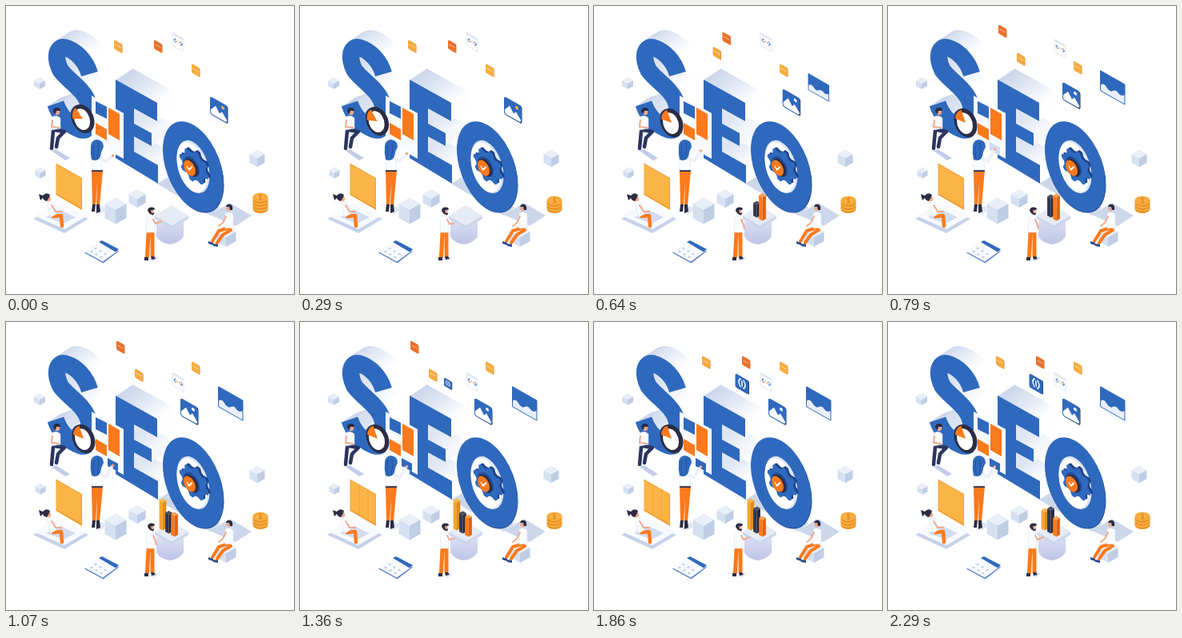
Recreate the animation shown at these times as an HTML page. Size 360 by 360 pixels, loop 2.43 s.

```html
<!DOCTYPE html>
<html lang="en">
<head>
<meta charset="utf-8">
<title>SEO isometric scene</title>
<style>
  html, body { margin: 0; width: 100%; height: 100%; overflow: hidden; background: #fff; }
  svg { display: block; width: 100vw; height: 100vh; }
  .b { fill: #2f69bd } .o { fill: #fb7a1c } .y { fill: #fbb447 } .d { fill: #2b2d45 }
  .w { fill: #fff } .s { fill: #f2a98b } .l { fill: #cdd7ec } .p { fill: #f8fafe }
  .shirt { fill: #fbfcff; stroke: #d5dcec; stroke-width: .5 }
  .line { fill: none; stroke-linecap: round; stroke-linejoin: round }
</style>
</head>
<body>
<svg viewBox="0 0 360 360">
  <defs>
    <linearGradient id="side"><stop stop-color="#cbd6eb"/><stop offset=".55" stop-color="#e4eaf6"/><stop offset="1" stop-color="#fff"/></linearGradient>
    <linearGradient id="base" x2="0" y2="1"><stop stop-color="#dcdff2"/><stop offset="1" stop-color="#bec4e8"/></linearGradient>
    <path id="S" fill="none" stroke-width="21.5" d="M104.500 85C100 69 88 56 74 52C62 50 61 66 68 80C76 92 98 104 103 122C108 146 104 159 92 154C77 148 67 137 62 122"/>
    <path id="E" d="M137 92L189 121V144L160 128V147L182 159V175L160 163V182L190 199V222L137 190Z"/>
  </defs>

  <!-- ground shadows -->
  <path class="l" d="M189 222L202 214L268 252L255 262ZM255 261L280 246L307 262L287 275Z"/>
  <g id="letters"></g>

  <!-- letter O with gear -->
  <g transform="matrix(1 .57 0 1 234 201)">
    <ellipse cx=".5" cy=".5" rx="38" ry="52.5" fill="#1e438c"/>
    <ellipse class="b" rx="38" ry="52.5"/>
    <ellipse rx="20.5" ry="31" fill="#dbe4f3"/>
    <ellipse class="w" cx="-1.5" cy="1.5" rx="19" ry="29.5"/>
    <path id="gearSide" fill="#1e438c" transform="translate(3.5 -4)"/>
    <path id="gear" class="b" transform="translate(1 -1)"/>
    <ellipse cx="-2" cy="1" rx="10" ry="11.5" fill="#24498f"/>
    <ellipse class="d" cx="-2.500" cy="2.500" rx="8.500" ry="10"/>
    <ellipse class="o" cx="-4.500" cy="4" rx="7.500" ry="9"/>
    <path class="line" stroke="#fff" stroke-width="1.500" d="M-7.500 4L-5.500 7L-1.500 1"/>
  </g>

  <g id="cubes"></g>

  <!-- page panel -->
  <path class="p" d="M107 112L147 134V191L107 169Z"/>
  <path class="b" d="M112 119L126 126V141L112 134Z"/>
  <path class="o" d="M128 127L142 135V168L128 160ZM112 146L126 154V168L112 160Z"/>
  <path class="b" id="block" d="M127 170L140 177V187L127 180Z"/>

  <!-- ring chart -->
  <g id="ring">
    <ellipse class="b" cx="-2" cy="1" rx="14" ry="17"/>
    <ellipse class="d" rx="14.500" ry="17.500"/>
    <ellipse class="w" cx="-1" cy="1" rx="10" ry="13"/>
    <path class="o" id="wedge"/>
  </g>

  <!-- seated reader -->
  <path d="M57 181L62 179L80 190L74 193Z" fill="#c3cbea"/>
  <path class="b" d="M62 150L82 146L85 152L70 159L62 157Z"/>
  <path class="line" stroke="#2c3560" stroke-width="4.500" d="M61 155L73 157L65 165L63 176M59 156L57 178"/>
  <path class="shirt" d="M57 139Q63 135 68 140L68 153L57 155Z"/>
  <path class="line" stroke="#f2a98b" stroke-width="2" d="M58 143L57 151L66 152"/>
  <ellipse class="s" cx="64" cy="132.500" rx="3.200" ry="3.800"/>
  <path class="d" d="M59 132Q59 127 64 127Q68 127 68 131L63 131L62 135Z"/>

  <!-- standing woman -->
  <path d="M112 256L120 250L126 254L117 261Z" fill="#e2e8f4"/>
  <path class="o" d="M107 206H121L117 249H113L114 220L112 249H108Z"/>
  <path class="d" d="M107 205H121V207H107ZM108 248H112L111 257H107ZM113 248H117L118 257L113 259Z"/>
  <path class="shirt" d="M107 186L119 184L121 205L107 205Z"/>
  <path class="line" id="sleeve" stroke="#eef1f9" stroke-width="4"/>
  <circle class="s" id="hand" r="1.800"/>
  <path class="b" d="M106 175Q107 167 114 167Q122 168 122 176Q119 181 118 188Q115 195 107 192Q105 184 106 175Z"/>
  <path class="line" stroke="#1f4b97" stroke-width=".8" d="M110 173Q108 183 110 191M115 171Q117 180 114 191"/>

  <!-- laptop and its user -->
  <path d="M34 266L66 250L103 266L73 284Z" fill="#c6d1ea"/>
  <path class="p" d="M35 262L66 246L102 262L73 279Z"/>
  <path d="M50 264L68 255L87 264L72 272Z" fill="#d3dcef"/>
  <path d="M62.500 196.500L95 215V255L62.500 236Z" fill="#f49d33"/>
  <path class="y" d="M63 198L94 215.500V252L63 234.500Z"/>
  <path class="line" id="columns" stroke="#ef9a2a" stroke-width=".8" d="M74 204V241M85 210V247"/>
  <path class="line" stroke="#fb7a1c" stroke-width="4.500" d="M59 263L69 262L70 275"/>
  <path class="shirt" d="M51 246L59 245L63 260L56 264Z"/>
  <path class="line" stroke="#f2a98b" stroke-width="2" d="M57 249L62 257L69 257"/>
  <circle class="s" cx="53" cy="241" r="3.200"/>
  <path class="d" d="M41 235L46 237Q50 232 55 236L54 239L51 244Q47 243 46 240L43 243Z"/>

  <!-- calendar -->
  <path d="M98 308.500L118 294L141 306.500L121.500 321.500Z" fill="#5f87ca"/>
  <path class="p" d="M98 307L118 293L141 305L121 319.500Z"/>
  <path class="b" d="M116 295L120 293L141 304L137 307.500Z"/>
  <g id="days" fill="#c4d0ea"></g>

  <!-- table, bars and presenter -->
  <path d="M188 268L207 277L222 268V288Q217 296 205 298Q192 296 188 288Z" fill="url(#base)"/>
  <path class="l" d="M186 262L207 274L228 262V266L207 279L186 266Z"/>
  <path d="M186 262L207 249L228 262L207 274Z" fill="#e6ebf6"/>
  <g id="bars"></g>
  <path d="M179 317L186 312L191 315L184 320Z" fill="#e4e9f5"/>
  <path class="line" stroke="#fb7a1c" stroke-width="5" d="M178 284L176.500 313M183 284L183 312"/>
  <path class="d" d="M173 314H178V318H173ZM181 313H185L187 316L182 317Z"/>
  <path class="shirt" d="M176 264Q180 260 185 263L186 283L175 283Z"/>
  <path class="line" id="arm" stroke="#f2a98b" stroke-width="2"/>
  <circle class="s" cx="181.500" cy="257" r="3.200"/>
  <path class="d" d="M177 256Q177 251.500 182 251.500Q186 251.500 186 254.500L181 255.500L182 259L185.500 258.500L184 261.500L180 260Z"/>

  <!-- seated man -->
  <path class="line" stroke="#fb7a1c" stroke-width="4" d="M279 277L266 281L258 294M281 280L271 286L264 296"/>
  <path d="M253 294L259 296V299L253 297ZM259 297L265 298V301L259 300Z" fill="#2c4a8c"/>
  <path class="shirt" d="M274 259Q279 256 284 260L284 277L274 278Z"/>
  <path class="line" stroke="#f2a98b" stroke-width="1.800" d="M275 263L271 271L266 275"/>
  <circle class="s" cx="278.500" cy="253" r="3.200"/>
  <path class="d" d="M275 251Q276 246.500 281 248Q284 250 283 255L280 255L279 251Z"/>

  <g id="coins"></g>

  <!-- floating cards -->
  <g id="wave"><rect class="b" x="-16" y="-13" width="31.500" height="26" rx="1"/>
    <path d="M-15 5Q-12 1-9 3Q-4 9 0 4Q4 0 7 3Q10 6 14.500 1V12H-15Z" fill="#e9effa"/></g>
  <g id="photo"><rect class="d" x="-10.500" y="-11" width="22" height="22" rx="2.500"/><rect class="b" x="-11" y="-11" width="22" height="22" rx="2.500"/>
    <path class="w" d="M-10 5L-4-3L1 4L4 0L10 7V8.500L8.500 10H-8.500L-10 8.500Z"/><circle id="sun" cx="5" cy="-5.500" r="2"/></g>
  <g id="code"><rect x="-7" y="-8" width="14" height="16" rx="1.500" fill="#fdfdff" stroke="#d9e1ef" stroke-width=".7"/>
    <path d="M-6.500-7.500H6.500V-5.500H-6.500Z" fill="#dbe4f1"/>
    <path class="line" stroke="#5f87ca" stroke-width="1.200" d="M-3-2L-5 0L-3 2M3.500-2L5.500 0L3.500 2"/>
    <path class="line" stroke="#fb7a1c" stroke-width="1.300" d="M-1.500 0H-1M1.500 0H2"/></g>
  <g id="info"><rect class="d" x="-8" y="-8" width="17" height="17" rx="2"/><rect class="b" x="-8.500" y="-8" width="17" height="17" rx="2"/>
    <path class="line" stroke="#fff" stroke-width="1.500" d="M-2-5Q-6 0-2 5M2-5Q6 0 2 5M0-3V3"/></g>
  <g id="tagA"></g><g id="tagB"></g><g id="tagC"></g>
</svg>
<script>
const $ = id => document.getElementById(id);
const set = (id, attrs) => { for (const k in attrs) $(id).setAttribute(k, attrs[k]); };

// Letters: light copies pushed back, then the blue face
function extrude(id, dx, dy, paint) {
  let out = '';
  for (let i = 20; i >= 0; i--) {
    const fill = i ? 'url(#side)' : '#2f69bd';
    out += `<use href="#${id}" ${paint}="${fill}" transform="translate(${dx * i / 20} ${-dy * i / 20})"/>`;
  }
  return out;
}
$('letters').innerHTML = extrude('S', 17, 11, 'stroke') + extrude('E', 21, 14, 'fill');

const box = (x, y, w, h, top, left, right) => {
  const r = w / 2, q = w * .28;
  return `<path fill="${left}" d="M${x - r} ${y}l${r} ${q}v${h}l${-r} ${-q}z"/>` +
    `<path fill="${right}" d="M${x + r} ${y}l${-r} ${q}v${h}l${r} ${-q}z"/>` +
    `<path fill="${top}" d="M${x - r} ${y}l${r} ${-q}l${r} ${q}l${-r} ${q}z"/>`;
};
$('cubes').innerHTML = [[42, 93, 14, 7], [43, 205, 13, 7], [137, 247, 27, 18], [164, 235, 21, 11],
  [314, 185, 19, 11], [275, 282, 25, 12]]
  .map(c => box(...c, '#e8eff8', '#d5e0f0', '#bfcde5')).join('');

let gear = 'M';
for (let i = 0; i < 32; i++) {
  const a = (i + .5) * Math.PI / 16, r = i % 4 < 2 ? 18.5 : 15;
  gear += `${(r * Math.cos(a)).toFixed(1)} ${(r * 1.08 * Math.sin(a)).toFixed(1)} `;
}
set('gear', { d: gear + 'Z' });
set('gearSide', { d: gear + 'Z' });

let days = '';
for (let i = 0; i < 6; i++) {
  const u = i % 3, v = i / 3 | 0;
  days += `<ellipse cx="${112 + u * 6 - v * 5}" cy="${303 + u * 3.5 + v * 4}" rx="1.700" ry="1.300"/>`;
}
$('days').innerHTML = days;

const tag = color => `<rect x="-4.500" y="-5" width="10" height="11" rx="1.500" fill="#d07a34"/>
  <rect x="-5" y="-5" width="10" height="11" rx="1.500" fill="${color}"/>
  <path class="line" stroke="#fff" stroke-opacity=".6" d="M-3 0H-1M0 0H1M2 0H3"/>`;
$('tagA').innerHTML = tag('#ea702a');
$('tagB').innerHTML = tag('#f7a93e');
$('tagC').innerHTML = tag('#f9ae3c');

// Eased value at t from pairs: time, value, time, value ...
function at(t, ...k) {
  if (t <= k[0]) return k[1];
  for (let i = 2; i < k.length; i += 2) if (t <= k[i]) {
    const u = (t - k[i - 2]) / (k[i] - k[i - 2]);
    return k[i - 1] + (k[i + 1] - k[i - 1]) * u * u * (3 - 2 * u);
  }
  return k[k.length - 1];
}

const place = (id, x, y, sx = 1, sy = sx, skew = .57) =>
  set(id, { transform: `translate(${x} ${y}) matrix(1 ${skew} 0 1 0 0) scale(${sx} ${sy})` });

const sector = (a, b, rx, ry) => {
  const p = d => `${rx * Math.cos(d * Math.PI / 180)} ${ry * Math.sin(d * Math.PI / 180)}`;
  return `M0 0L${p(a)}A${rx} ${ry} 0 0 1 ${p(b)}Z`;
};

function draw(t) {
  place('wave', 281, 102, at(t, 410, 0, 500, .32, 710, 1), at(t, 410, 0, 500, .17, 710, 1));
  place('photo', at(t, 500, 266, 780, 229), at(t, 500, 130, 780, 112));
  set('sun', { fill: t < 600 ? '#fbb447' : '#fff' });
  place('code', 215, at(t, 640, 45, 1070, 75));
  place('info', 185, 77, at(t, 1210, 0, 1480, 1));
  place('tagA', at(t, 500, 190, 780, 143, 1430, 143, 1780, 190), at(t, 500, 50, 780, 31, 1430, 31, 1780, 50));
  place('tagB', at(t, 500, 140, 780, 166, 1430, 166, 1780, 140), at(t, 500, 50, 780, 66, 1430, 66, 1780, 50));
  place('tagC', 237, at(t, 700, 80, 1060, 57));

  place('ring', at(t, 0, 96, 500, 97), at(t, 0, 141, 500, 146), 1, 1, .3);
  const turn = at(t, 0, 165, 790, 185);
  set('wedge', { d: sector(turn, turn + 60, 13, 16) });
  set('block', { opacity: at(t, 700, 0, 1000, 1) });

  const hy = at(t, 0, 187, 500, 183, 790, 179, 1570, 181);
  set('sleeve', { d: `M118 191L125 194L132 ${hy + 2}` });
  set('hand', { cx: 133.5, cy: hy });
  set('columns', { opacity: at(t, 1140, 0, 1360, .9, 1860, .9, 2150, 0) });
  const reach = at(t, 200, 1, 430, 0, 1140, 0, 1430, 1);
  set('arm', { d: `M184 267L187 ${274 - 2 * reach}L${188 + 6 * reach} ${278 - 9 * reach}` });

  const tops = [
    [196, 258, at(t, 790, 258, 1000, 223, 1860, 223, 2220, 235), '#fcb843', '#f5a52d', '#df8d1d'],
    [203.5, 262, at(t, 420, 262, 500, 259, 750, 238, 1570, 239, 1860, 233), '#4a4c65', '#343650', '#24263b'],
    [210.5, 266, at(t, 280, 266, 480, 236, 790, 237, 1070, 240, 1570, 245), '#ffa04f', '#fb7a1c', '#e3620e']
  ];
  $('bars').innerHTML = tops.map(([x, foot, y, ...c]) =>
    foot - y > .5 ? box(x, y, 8.8, foot - y, ...c) : '').join('');

  const count = t < 250 ? 4 : 3;
  let coins = '';
  for (let i = 0; i < count; i++) {
    const y = 251 - i * 4;
    coins += `<path d="M308.500 ${y}v2.500a9.500 5.500 0 0 0 19 0v-2.500z" fill="#ea9428"/>` +
      `<ellipse class="y" cx="318" cy="${y}" rx="9.500" ry="5.500"/>`;
  }
  const face = 255 - count * 4;
  $('coins').innerHTML = coins + `<ellipse cx="318" cy="${face}" rx="7" ry="3.800" fill="none" stroke="#ea9428" stroke-width=".8"/>
    <text x="318" y="${face + 2.5}" font-size="7" font-weight="700" text-anchor="middle" fill="#e08418" font-family="Inter, sans-serif">$</text>`;
}

const LOOP = 2430, STEP = 2290 / 32;
function tick() {
  const t = performance.now() % LOOP;
  draw(Math.min(32, Math.floor((t + 8) / STEP)) * STEP);
  requestAnimationFrame(tick);
}
tick();
</script>
</body>
</html>
```
